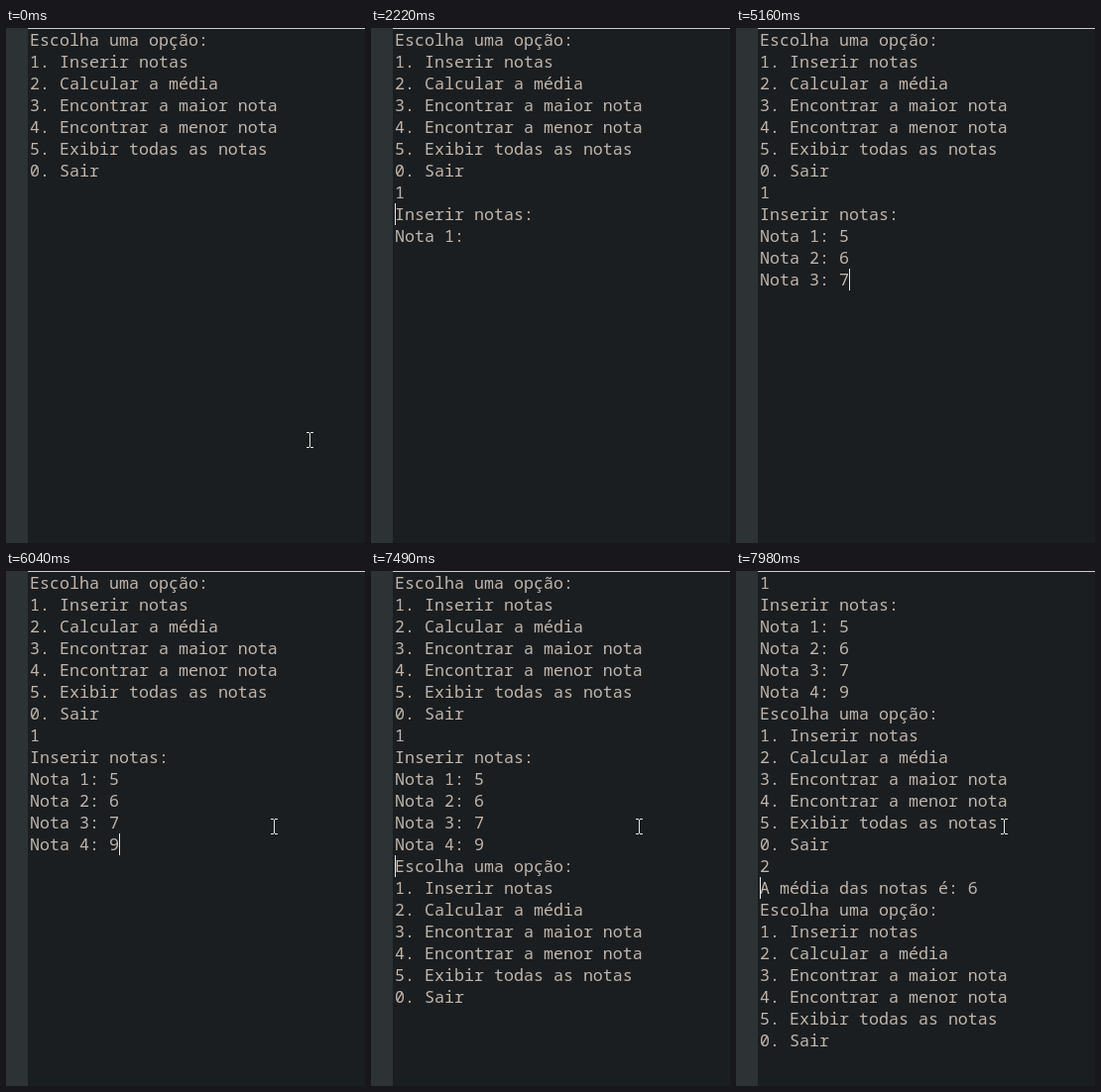
An HTML page that plays this animation: 362x520 px, repeating every 8000 ms.

```html
<!DOCTYPE html>
<html lang="pt">
<head>
<meta charset="utf-8">
<title>Notas</title>
<style>
  html, body { margin: 0; width: 100%; height: 100%; overflow: hidden; background: #1b1e20; }
  #stage { position: relative; width: 362px; height: 520px; overflow: hidden; background: #1b1e20; }
  #gutter { position: absolute; left: 0; top: 0; width: 22px; height: 520px; background: #2d3235; }
  #edge { position: absolute; left: 22px; top: 0; right: 0; height: 1px; background: #c9cacb; }
  #view { position: absolute; left: 24px; top: 1px; right: 0; height: 513px; overflow: hidden; }
  #log {
    position: absolute; left: 0; top: 0; margin: 0; color: #c0b5ac;
    font: 16.667px/22px "Noto Sans Mono", "DejaVu Sans Mono", monospace;
    font-variant-ligatures: none; white-space: pre;
  }
  #caret { position: absolute; width: 1px; height: 22px; background: #e4e4e4; }
  #mouse { position: absolute; left: 0; top: 0; width: 7px; height: 16px; }
</style>
</head>
<body>
<div id="stage">
  <div id="gutter"></div>
  <div id="edge"></div>
  <div id="view"><pre id="log"></pre><div id="caret"></div></div>
  <svg id="mouse" viewBox="0 0 7 16" shape-rendering="crispEdges">
    <path d="M0 0h3v1H0zM4 0h3v1H4zM3 1h1v14H3zM0 15h3v1H0zM4 15h3v1H4z" fill="#e6e6e6"/>
  </svg>
</div>
<script>
const LOOP = 8000, ROW = 22, COL = 10;
const MENU = `Escolha uma opção:
1. Inserir notas
2. Calcular a média
3. Encontrar a maior nota
4. Encontrar a menor nota
5. Exibir todas as notas
0. Sair
`;
const REST = [267, 250];

// Each step changes only what it names: add text, caret [row, col], mouse [x, y], scrolled rows.
const steps = [
  [0, { add: MENU, caret: null, mouse: [303, 408], scroll: 0 }],
  [60, { mouse: [274, 278] }],
  [200, { mouse: [269, 256] }],
  [270, { mouse: REST }],
  [590, { mouse: [273, 253] }],
  [680, { mouse: REST }],
  [780, { caret: [7, 0] }],
  [1280, { caret: null }],
  [1840, { add: "1", caret: [7, 1] }],
  [2220, { add: "\nInserir notas:\nNota 1: ", caret: [8, 0], mouse: null }],
  [2280, { mouse: REST }],
  [2780, { caret: null }],
  [3290, { add: "5", caret: [9, 9] }],
  [3600, { add: "\nNota 2: ", caret: [10, 0] }],
  [4030, { add: "6", caret: [10, 9] }],
  [4410, { add: "\nNota 3: ", caret: [11, 0] }],
  [4910, { caret: null }],
  [5160, { add: "7", caret: [11, 9], mouse: null }],
  [5230, { mouse: REST }],
  [5480, { add: "\nNota 4: ", caret: [12, 0], mouse: null }],
  [5550, { mouse: REST }],
  [6040, { add: "9", caret: [12, 9] }],
  [6360, { add: "\n" + MENU, caret: [13, 0], mouse: null }],
  [6430, { mouse: REST }],
  [6930, { caret: null }],
  [7490, { caret: [13, 0] }],
  [7550, { add: "2", caret: [20, 1], mouse: null }],
  [7620, { mouse: REST }],
  [7930, { add: "\nA média das notas é: 6\n" + MENU, caret: [21, 0], mouse: null }],
  [7980, { scroll: 7, mouse: REST }]
];

let state = { text: "" };
const states = steps.map(([time, { add = "", ...change }]) =>
  state = { ...state, ...change, text: state.text + add, time });

const [log, caret, mouse] = ["log", "caret", "mouse"].map(id => document.getElementById(id));

function place(el, pos) {
  el.style.visibility = pos ? "visible" : "hidden";
  if (pos) el.style.transform = `translate(${pos[0]}px, ${pos[1]}px)`;
}

function show(s) {
  log.textContent = s.text;
  log.style.top = -s.scroll * ROW + "px";
  place(caret, s.caret && [s.caret[1] * COL, (s.caret[0] - s.scroll) * ROW]);
  place(mouse, s.mouse);
}

let shown;
const start = performance.now();
function tick() {
  const t = (performance.now() - start) % LOOP;
  const now = states.filter(s => s.time <= t).pop();
  if (now !== shown) show(shown = now);
  requestAnimationFrame(tick);
}
tick();
</script>
</body>
</html>
```
